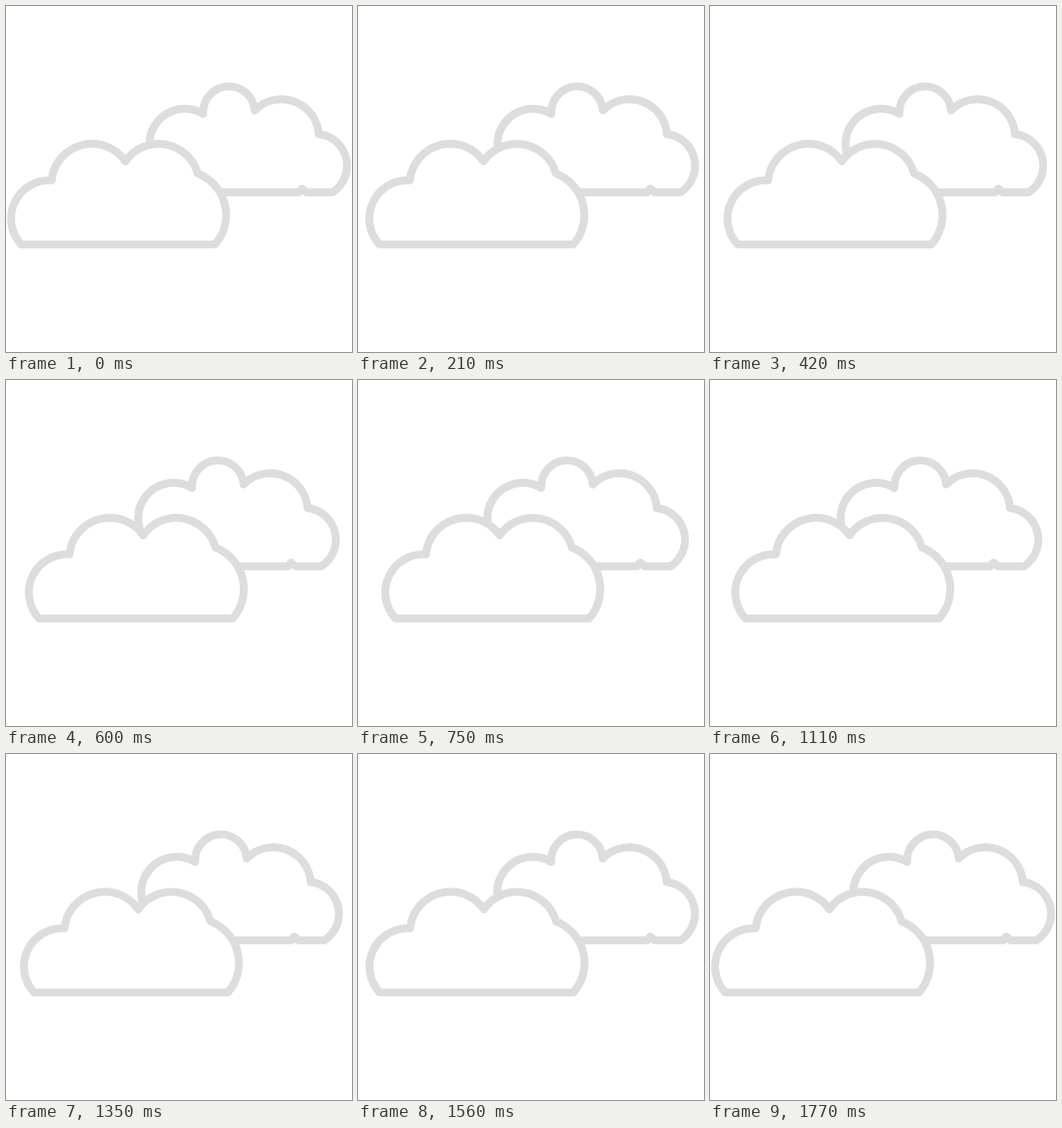
Recreate the animation shown at these times as an HTML page with a canvas. Size 500 px wide and 500 px high, loop 1.8 s.

```html
<!DOCTYPE html>
<html lang="en">
<head>
<meta charset="utf-8">
<title>Drifting clouds</title>
<style>
  html, body { margin: 0; width: 100%; height: 100%; overflow: hidden; background: #fff; }
  canvas { display: block; width: 100vmin; height: 100vmin; }
</style>
</head>
<body>
<canvas id="sky" width="500" height="500"></canvas>
<script>
  const LOOP = 1800, STEP = 30, TURN = 900, HOME = 1770;
  const FRONT_SHIFT = 38.5, BACK_SHIFT = -24.2;

  const ctx = document.getElementById('sky').getContext('2d');

  const arc = (r, x, y) => `A${r} ${r} 0 0 1 ${x} ${y}`;

  const front = new Path2D('M22 344.6' + arc(55.2, 66, 252) + arc(58.5, 172.5, 224.5) +
    arc(58.5, 277, 242) + arc(64.4, 302, 344.6) + 'Z');

  const back = new Path2D('M222 236' + arc(51.3, 285, 156) + arc(37.3, 359.5, 151) +
    arc(54, 452, 185) + arc(46, 472, 269.2) + 'H434.5L428 264L423.5 269.2H250');

  // Linear drift out and back, resting briefly at home
  function drift(t) {
    if (t <= TURN) return t / TURN;
    return Math.max(0, (HOME - t) / (HOME - TURN));
  }

  function cloud(path, dx) {
    ctx.save();
    ctx.translate(dx, 0);
    ctx.fill(path);
    ctx.stroke(path);
    ctx.restore();
  }

  function draw(t) {
    const k = drift(t);
    ctx.fillStyle = '#fff';
    ctx.fillRect(0, 0, 500, 500);
    ctx.strokeStyle = '#dbdedd';
    ctx.lineWidth = 11.4;
    ctx.lineJoin = ctx.lineCap = 'round';
    cloud(back, BACK_SHIFT * k);
    cloud(front, FRONT_SHIFT * k);
  }

  const start = performance.now();
  function tick() {
    const t = (performance.now() - start) % LOOP;
    draw(Math.floor(t / STEP) * STEP);
    requestAnimationFrame(tick);
  }
  tick();
</script>
</body>
</html>
```
